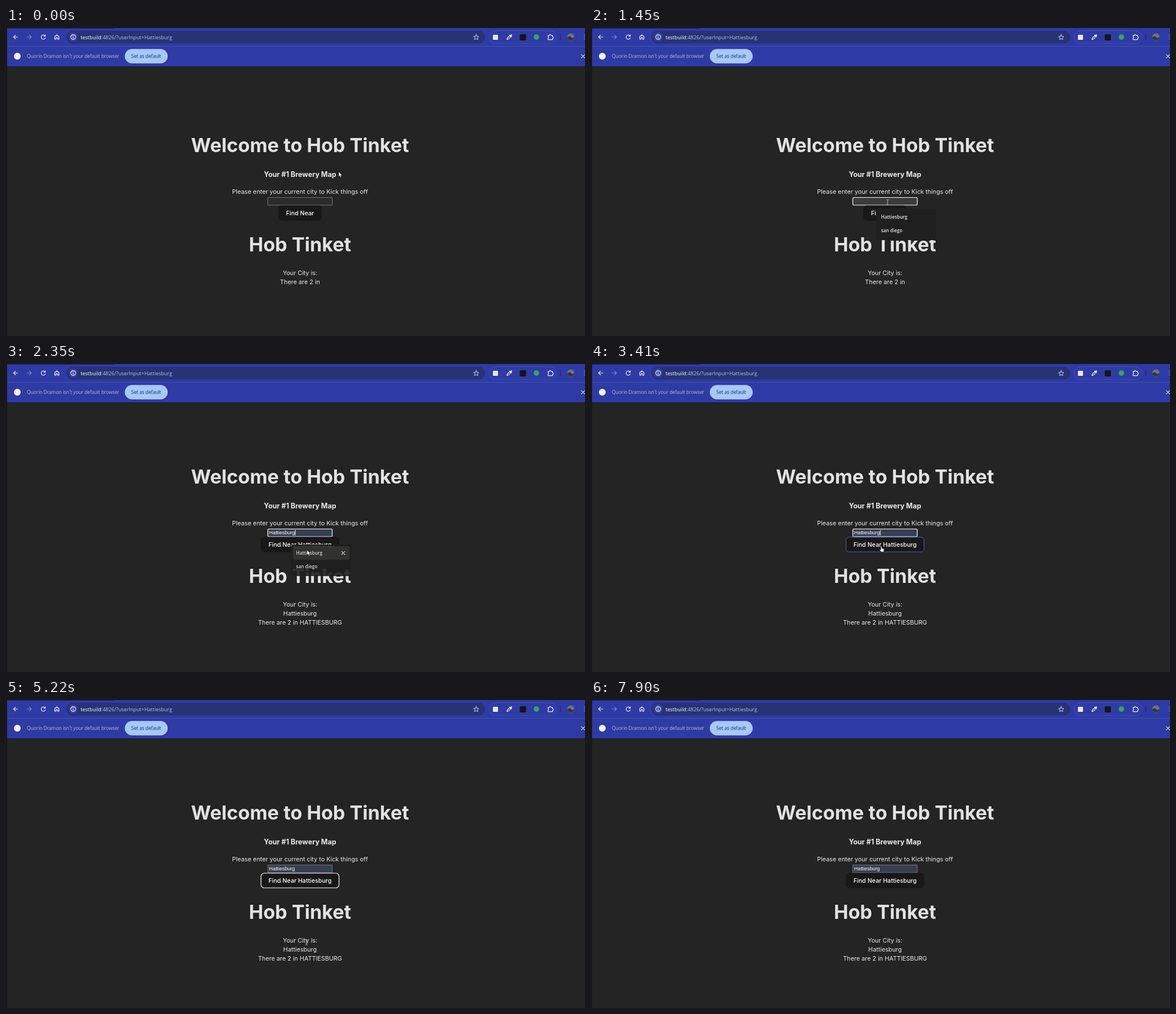
An HTML page that plays this animation: 1025 by 546 pixels, repeating every 8020 ms.

```html
<!DOCTYPE html>
<html lang="en">
<head>
<meta charset="utf-8">
<title>Brewery map</title>
<style>
  html, body { margin: 0; width: 100%; height: 100%; overflow: hidden; background: #242424; }
  svg { display: block; width: 1025px; height: 546px; }
  text { white-space: pre; }
  .page text { font: 400 10.8px Inter, sans-serif; font-optical-sizing: none; fill: #eaeaea; text-anchor: middle; }
  .page .title { font-size: 34.13px; font-weight: 700; fill: #e2e2e2; }
  .page .tagline { font-size: 12.48px; font-weight: 700; }
  .page .label { font-size: 10.67px; font-weight: 500; fill: #fff; }
  .page .value { font: 8.9px "Liberation Sans", Arial, sans-serif; fill: #fff; text-anchor: start; }
  .ui { font: 400 8.38px "Open Sans", sans-serif; }
  .medium { font-weight: 500; }
  .strong { font-size: 8.2px; font-weight: 600; }
  .line { fill: none; stroke: #e9ebfa; stroke-width: 1.2; stroke-linecap: round; stroke-linejoin: round; }
</style>
</head>
<body>
<svg viewBox="0 0 1025 546">
  <rect width="1025" height="546" fill="#242424"/>

  <g id="browser">
    <rect width="1025" height="68" fill="#2f3ba4"/>
    <rect width="192" height="1" fill="#1b2150"/>
    <rect y="32" width="1025" height="1" fill="#4450b4"/>
    <rect y="68" width="1025" height="1" fill="#18191f"/>
    <rect width="2" height="546" fill="#17181c"/>
    <rect x="107" y="5" width="741" height="22.5" rx="11.2" fill="#283275"/>
    <rect x="855.5" y="5" width="119" height="22.5" rx="11.2" fill="none" stroke="#4954b2" stroke-width=".8"/>
    <g class="line">
      <path d="M20.8 16H13.5M16.8 12.6L13.4 16L16.8 19.4"/>
      <path d="M37.5 16H44.8M41.5 12.6L44.9 16L41.5 19.4" stroke="#7d86cf"/>
      <path d="M69.2 14A3.8 3.8 0 1 0 69.6 17.4M69.6 12.2V14.6H67.2"/>
      <path d="M86.4 15L90 12.2L93.6 15V20H91.4V17.2H88.6V20H86.4Z"/>
      <path d="M832.3 11.6L833.6 14.8L837 15.1L834.4 17.3L835.2 20.6L832.3 18.8L829.4 20.6L830.2 17.3L827.6 15.1L831 14.8Z" stroke-width=".9"/>
      <path d="M886.8 20.4L887.4 18L891.8 13.6L893.6 15.4L889.2 19.8Z"/>
      <path d="M892 12.6L894.6 15.2M893.6 13.6L895 12.2" stroke-width="2"/>
      <path d="M959.6 13.2H962A1.5 1.5 0 0 1 965 13.2H967.6V15.4A1.5 1.5 0 0 1 967.6 18.4V20.6H959.6V18.2A1.5 1.5 0 0 0 959.6 15.4Z"/>
      <path d="M1018.7 47.4L1024.2 52.9M1024.2 47.4L1018.7 52.9" stroke-width="1.1"/>
    </g>
    <circle cx="119" cy="16" r="8.2" fill="#3640a0"/>
    <circle cx="119" cy="16" r="4.2" class="line" stroke-width="1"/>
    <path d="M119 15.6V18.3M119 13.7V14" class="line" stroke-width="1"/>
    <rect x="862" y="12" width="9" height="9" rx="1" fill="#e6e7ee"/>
    <rect x="909.5" y="11" width="11" height="11" rx="1.5" fill="#15161c"/>
    <circle cx="939" cy="16" r="4.8" fill="#36a562"/>
    <rect x="981.4" y="11" width="1" height="10" fill="#1c2468"/>
    <circle cx="1000" cy="16" r="6.5" fill="#70747c"/>
    <path d="M993.6 17Q997 12.5 1000 16T1006.4 15A6.5 6.5 0 0 1 993.6 17Z" fill="#33363d"/>
    <path d="M1024 12.5V12.5M1024 16V16M1024 19.5V19.5" class="line" stroke-width="1.8"/>
    <text class="ui" x="132" y="19.6" style="font-size:9px" fill="#bcc0d8"><tspan fill="#fff">testbuild</tspan>:4826/?userInput=Hattiesburg</text>

    <circle cx="20" cy="50" r="6" fill="#f0f1f8"/>
    <text class="ui" x="37" y="53.2" fill="#b8bac8">Quorin Dramon isn't your default browser</text>
    <rect x="210.3" y="37.2" width="76" height="25.6" rx="12.8" fill="#a8c7fa"/>
    <text class="ui medium" x="248.2" y="53.2" text-anchor="middle" fill="#10306c">Set as default</text>
  </g>

  <g id="page" class="page">
    <text class="title" x="520.5" y="220.3">Welcome to Hob Tinket</text>
    <text class="tagline" x="520.5" y="264">Your #1 Brewery Map</text>
    <text x="520.5" y="293.8">Please enter your current city to Kick things off</text>
    <rect id="field" x="463.5" y="300.5" width="114" height="13.5"/>
    <text id="value" class="value" x="465.8" y="310"></text>
    <rect id="caret" y="302.3" width="1" height="9.6" fill="#fff"/>
    <rect id="button" y="315" height="26" rx="5.3"/>
    <text id="label" class="label" x="520.5" y="331.7"></text>
    <text class="title" x="520.5" y="396">Hob Tinket</text>
    <text x="520.5" y="437.7">Your City is:</text>
    <text id="city" x="520.5" y="453.7"></text>
    <text id="count" x="520.5"></text>
  </g>

  <g id="menu" class="ui strong" fill="#e8e8e8">
    <rect x="505" y="320" width="106" height="56" rx="3" fill="#1f1f1f"/>
    <g id="hover">
      <rect x="508" y="323" width="100" height="24" rx="2" fill="#343432"/>
      <path d="M594.2 332.2L599.8 337.8M599.8 332.2L594.2 337.8" class="line" stroke-width=".9"/>
    </g>
    <text x="513.5" y="338.2">Hattiesburg</text>
    <text x="513.5" y="362.3">san diego</text>
  </g>

  <g id="cursor">
    <path id="arrow" d="M0 0V8.6L2 6.8L3.4 9.8L4.7 9.2L3.4 6.3H6Z" fill="#fff" stroke="#111" stroke-width=".5"/>
    <path id="beam" d="M-2 -4.5H-.6L0 -4L.6 -4.5H2M0 -4V4M-2 4.5H-.6L0 4L.6 4.5H2" fill="none" stroke="#d0d0d0" stroke-width=".8"/>
    <path id="hand" d="M-1 -4.4Q0 -5.4 .8 -4.4V-1.2L4 -.4Q5 0 4.8 1.2L4 5H-.2L-3.2 1.6Q-3 .2 -1 1.6Z" fill="#fff" stroke="#111" stroke-width=".5"/>
  </g>
</svg>

<script>
const LOOP = 8020;
const CITY = 'Hattiesburg';
const el = id => document.getElementById(id);
const set = (id, attrs) => {
  for (const name in attrs) el(id).setAttribute(name, attrs[name]);
};
const show = (id, on) => { el(id).style.display = on ? '' : 'none'; };
const between = (t, from, to) => t >= from && t < to;

// time, x, y, pointer shape; each pose holds until the next one
const POINTER = [
  [0, 589, 255, 'arrow'], [260, 577, 272, 'arrow'], [390, 549, 296, 'arrow'],
  [520, 525, 309, 'beam'],
  [1710, 528, 317, 'arrow'], [1840, 532, 327, 'arrow'], [1960, 533, 330, 'arrow'],
  [2490, 533, 327, 'hand'], [3150, 526, 328, 'hand'], [3280, 514, 328, 'hand'],
  [4050, 516, 329, 'hand'], [4180, 521, 344, 'arrow'], [4310, 530, 372, 'beam'],
  [4440, 540, 402, 'arrow'], [4570, 547, 424, 'beam'], [4820, 539, 413, 'arrow'],
  [4960, 533, 407, 'arrow'], [5220, 532, 429.5, 'beam'], [5370, 515, 455, 'beam'],
  [5500, 501, 470, 'arrow'], [5650, 496, 471, 'arrow'], [5780, 495, 458, 'beam'],
  [5910, 502, 430, 'beam'], [6040, 508, 400, 'arrow'], [6180, 511, 270, 'arrow'],
  [6300, 512.5, 150, 'arrow'], [6450, 585, 215, 'arrow'], [6580, 690, 320, 'arrow'],
  [6700, 790, 415, 'arrow'], [6830, 880, 496, 'arrow'], [6980, 898, 511, 'arrow'],
  [7260, 955, 537, 'arrow'], [7390, 0, 0, 'none']
];

function drawPage(t) {
  const filled = t >= 2350;
  const typing = between(t, 780, 3530);
  const hovered = between(t, 2490, 3530);
  const pressed = between(t, 3530, 7900);

  set('page', { transform: `translate(0 ${filled ? -8 : 0})` });
  set('field', {
    fill: filled ? '#373f52' : typing ? '#3b3b3b' : '#2b2b2b',
    stroke: typing ? '#fff' : '#858585',
    'stroke-width': typing ? 1.2 : 0.8,
    rx: typing ? 1.5 : 0
  });
  el('value').textContent = filled ? CITY : '';
  set('caret', { x: filled ? 511.6 : 465.5 });
  show('caret', between(t, 910, 1450) || between(t, 1960, 2880) || between(t, 3410, 3530));

  const width = filled ? 138 : 76;
  set('button', {
    x: 520.5 - width / 2, width,
    fill: '#181818',
    stroke: pressed ? '#fff' : hovered ? '#5a61e0' : '#181818',
    'stroke-width': pressed ? 1.2 : 0.9
  });
  el('label').textContent = filled ? 'Find Near ' + CITY : 'Find Near';
  el('city').textContent = filled ? CITY : '';
  el('count').textContent = filled ? 'There are 2 in ' + CITY.toUpperCase() : 'There are 2 in';
  set('count', { y: filled ? 469.7 : 453.7 });
}

function drawMenu(t) {
  show('menu', between(t, 1060, 2620));
  show('hover', t >= 1960);
  set('menu', { opacity: t < 2350 ? 1 : t < 2490 ? 0.9 : 0.4 });
}

function drawPointer(t) {
  const [, x, y, shape] = POINTER.findLast(pose => pose[0] <= t);
  set('cursor', { transform: `translate(${x} ${y})` });
  for (const id of ['arrow', 'beam', 'hand']) show(id, id === shape);
}

function frame() {
  const t = performance.now() % LOOP;
  drawPage(t);
  drawMenu(t);
  drawPointer(t);
  requestAnimationFrame(frame);
}
frame();
</script>
</body>
</html>
```
